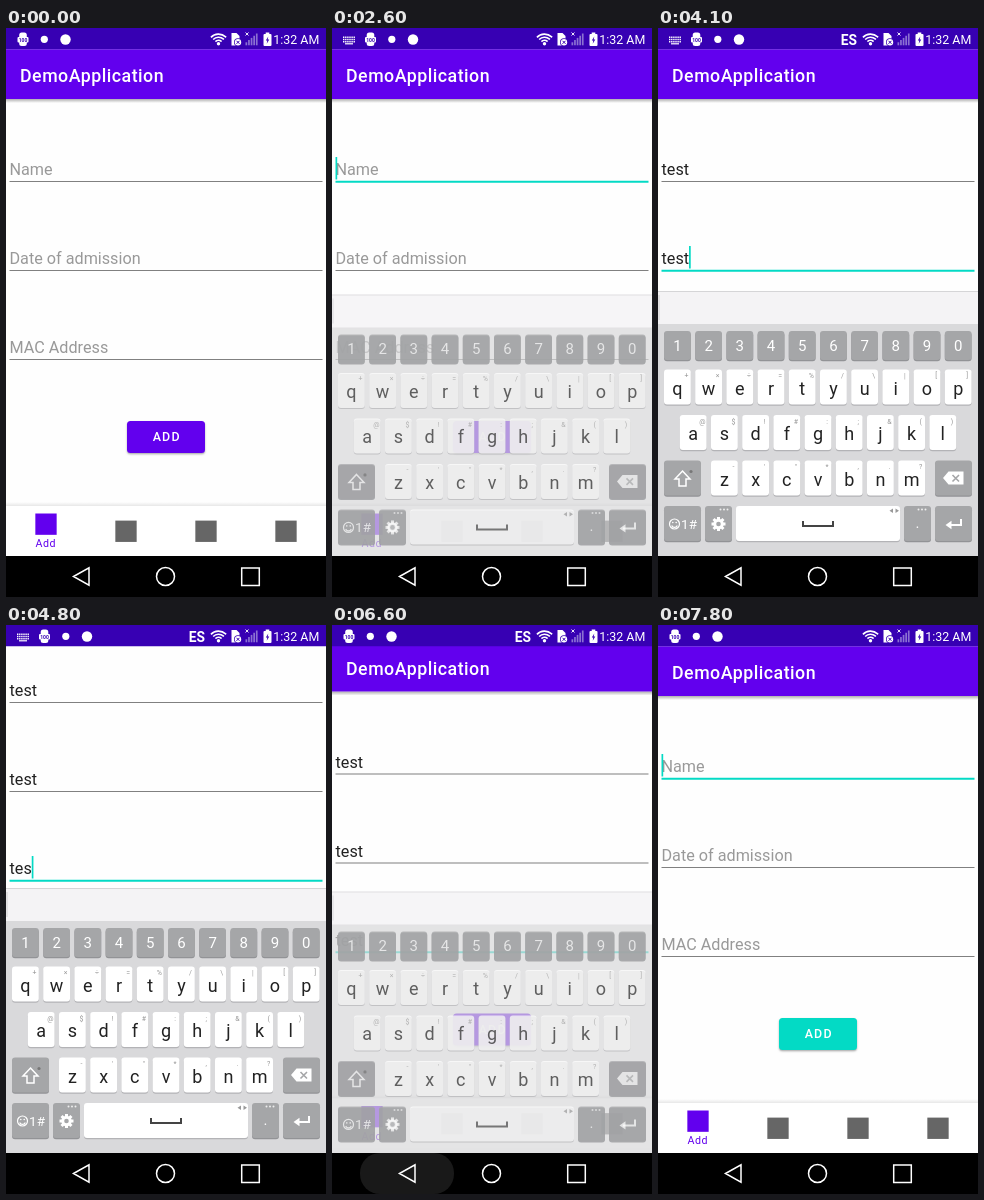
Animation, 320 px wide and 569 px high, one loop 8000 ms. Source, as an HTML page with a canvas:

```html
<!DOCTYPE html>
<html lang="en">
<head>
<meta charset="utf-8">
<title>Form demo</title>
<style>
html, body { margin: 0; width: 320px; height: 569px; overflow: hidden; background: #fff; }
canvas { display: block; width: 320px; height: 569px; }
</style>
</head>
<body>
<canvas id="stage" width="320" height="569"></canvas>
<script>
const ctx = document.getElementById('stage').getContext('2d');
const LOOP = 8000, STEP = 100, PAN = 76;
const STATUS_H = 21.33, TOOLBAR_END = 71.1;
const PURPLE = '#6200ee', DARK = '#3700b3', TEAL = '#03dac5', KEY_GREY = '#a5a6a8';

const clamp = v => Math.max(0, Math.min(1, v));
const ramp = (t, from, to) => clamp((t - from) / (to - from));
const easeOut = (p, power = 2) => 1 - (1 - p) ** power;

// Scroll curve: short exponential start, long exponential settling
function viscous(p) {
  const curve = x => x < 1 ? x - 1 + Math.exp(-x) : 1 - (1 - Math.exp(-1)) * Math.exp(1 - x);
  return curve(8 * p) / curve(8);
}

function rect(x, y, w, h, fill, r = 0) {
  ctx.fillStyle = fill;
  ctx.beginPath();
  ctx.roundRect(x, y, w, h, r);
  ctx.fill();
}

function disc(x, y, r, fill) {
  ctx.fillStyle = fill;
  ctx.beginPath();
  ctx.arc(x, y, r, 0, 7);
  ctx.fill();
}

function path(d, { fill, stroke, width = 1.5 }) {
  const p = new Path2D(d);
  if (fill) { ctx.fillStyle = fill; ctx.fill(p); }
  if (stroke) { ctx.strokeStyle = stroke; ctx.lineWidth = width; ctx.stroke(p); }
}

function text(s, x, y, size, color, { weight = 400, align = 'left', spacing = 0 } = {}) {
  ctx.font = `${weight} ${size}px Roboto, sans-serif`;
  ctx.letterSpacing = spacing + 'px';
  ctx.textAlign = align;
  ctx.fillStyle = color;
  ctx.fillText(s, x, y);
}

// Each field: hint, underline position, [time, value] edits
const fields = [
  { hint: 'Name', y: 153, edits: [[3100, 't'], [3200, 'tes'], [3300, 'test'], [7500, '']] },
  { hint: 'Date of admission', y: 242, edits: [[3800, 't'], [3900, 'te'], [4000, 'tes'], [4100, 'test'], [7500, '']] },
  { hint: 'MAC Address', y: 331, edits: [[4600, 't'], [4700, 'te'], [4800, 'tes'], [5000, 'test'], [7500, '']] }
];
const focusChanges = [[0, -1], [2400, 0], [3500, 1], [4250, 2], [7500, 0]];
const latest = (list, t) => list.filter(e => e[0] <= t).pop();

function drawFields(t) {
  const [focusTime, focus] = latest(focusChanges, t);
  fields.forEach((f, i) => {
    const [editTime, value] = latest(f.edits, t) || [0, ''];
    text(value || f.hint, 3.5, f.y - 6, 16.2, value ? '#212121' : '#999');
    const active = i === focus;
    if (active) rect(3.5, f.y - 0.3, 313, 2, TEAL);
    else rect(3.5, f.y, 313, 1, '#808080');
    const blinkOn = (t - Math.max(focusTime, editTime)) % 1000 < 500;
    if (active && blinkOn) {
      const x = value ? 3.5 + ctx.measureText(value).width : 3.5;
      rect(x, f.y - 24, 1.7, 22.5, TEAL);
    }
  });
}

function drawButton(t) {
  const lift = ramp(t, 7200, 7300) - ramp(t, 7500, 7700);
  ctx.save();
  ctx.shadowColor = 'rgba(0,0,0,.32)';
  ctx.shadowBlur = 2 + 3 * lift;
  ctx.shadowOffsetY = 1.2 + 1.8 * lift;
  rect(121, 393, 78, 32, t < 7400 ? PURPLE : TEAL, 3.5);
  ctx.restore();
  text('ADD', 160.7, 413.4, 12.44, '#fff', { weight: 500, align: 'center', spacing: 1.2 });
}

function drawApp(t) {
  const shadow = ctx.createLinearGradient(0, TOOLBAR_END, 0, 75);
  shadow.addColorStop(0, 'rgba(0,0,0,.3)');
  shadow.addColorStop(1, 'rgba(0,0,0,0)');
  rect(0, TOOLBAR_END, 320, 4, shadow);
  rect(0, STATUS_H, 320, TOOLBAR_END - STATUS_H, PURPLE);
  text('DemoApplication', 14, 54, 17.78, '#fff', { weight: 500, spacing: 0.5 });
  drawFields(t);
  drawButton(t);

  const edge = ctx.createLinearGradient(0, 474, 0, 478);
  edge.addColorStop(0, 'rgba(0,0,0,0)');
  edge.addColorStop(1, 'rgba(0,0,0,.09)');
  rect(0, 474, 320, 4, edge);
  rect(0, 478, 320, 50, '#fff');
  const icon = 21.33;
  rect(40 - icon / 2, 485.5, icon, icon, PURPLE);
  text('Add', 39.7, 519, 10.67, PURPLE, { align: 'center', spacing: 0.5 });
  for (const x of [120, 200, 280]) rect(x - icon / 2, 492.6, icon, icon, '#666');
}

function key(x, y, w, h, fill) {
  rect(x, y + 1.2, w, h, fill === '#fff' ? '#b3b3b6' : '#929396', 3);
  rect(x, y, w, h, fill, 3);
}

function keyRow(letters, marks, x0, y) {
  [...letters].forEach((c, i) => {
    const x = x0 + i * 31.2;
    key(x, y, 26.8, 35, '#fff');
    text(c, x + 13.4, y + 25, 18, '#222', { align: 'center' });
    text(marks[i], x + 22.5, y + 8.5, 7, '#999', { align: 'center' });
  });
}

function drawKeyIcons() {
  path('M24.5 443 L32 451 H28 V458 H21 V451 H17 Z', { stroke: '#fff' });
  disc(33, 443.5, 1.6, '#777');
  path('M285 450 L290.5 443.5 H305.5 V456.5 H290.5 Z', { fill: '#fff' });
  path('M294.5 447 L301 453.5 M301 447 L294.5 453.5', { stroke: KEY_GREY, width: 1.6 });

  path('M21.5 496 a5 5 0 1 1 -10 0 a5 5 0 1 1 10 0 M13.7 497.5 a3 3 0 0 0 5.6 0', { stroke: '#fff', width: 1.2 });
  disc(14.8, 494.5, 0.8, '#fff');
  disc(18.2, 494.5, 0.8, '#fff');
  text('1#', 31, 501, 13.5, '#fff', { align: 'center' });

  ctx.save();
  ctx.translate(60.5, 496);
  for (let i = 0; i < 8; i++) {
    rect(-1.5, -7, 3, 4, '#fff');
    ctx.rotate(Math.PI / 4);
  }
  disc(0, 0, 5.2, '#fff');
  disc(0, 0, 2.3, KEY_GREY);
  ctx.restore();
  for (const x of [62.5, 260.5]) {
    for (let i = 0; i < 3; i++) disc(x + i * 3.5, 481.5, 1, '#eee');
  }

  path('M145 493 V498 H175 V493', { stroke: '#444', width: 2 });
  path('M235 480.5 V485 L231.5 482.8 Z M237.5 480.5 V485 L241 482.8 Z', { fill: '#999' });
  text('.', 259.5, 500, 15, '#fff', { align: 'center' });
  path('M303 491 V497 H291', { stroke: '#fff', width: 2 });
  path('M287.5 497 L293.5 492.8 V501.2 Z', { fill: '#fff' });
}

function drawKeyboard(t) {
  const enter = ramp(t, 2500, 2800), exit = ramp(t, 6500, 6650);
  if (!enter || exit === 1) return;
  ctx.save();
  ctx.globalAlpha = easeOut(enter, 3) * (1 - exit ** 3);
  ctx.beginPath();
  ctx.rect(0, 0, 320, 528);
  ctx.clip();
  ctx.translate(0, 26 * (1 - easeOut(enter, 5) + exit ** 5));
  rect(0, 263, 320, 34, '#f4f3f5');
  rect(0, 263, 320, 1, '#d5d5d7');
  rect(0.5, 267, 1, 25, '#d0d0d2');
  rect(0, 296, 320, 232, '#d9d9db');
  [...'1234567890'].forEach((c, i) => {
    const x = 6 + i * 31.2;
    key(x, 303, 26.8, 29, KEY_GREY);
    text(c, x + 13.4, 323, 15, '#fff', { align: 'center' });
  });
  keyRow('qwertyuiop', '+×÷=%/\\|[]', 6, 341.5);
  keyRow('asdfghjkl', '@$!#:;&()', 21.8, 387);
  keyRow('zxcvbnm', '-\'"*,.?', 53, 432.5);
  for (const [x, y, w] of [[6, 432.5, 37], [277, 432.5, 37], [6, 478, 37], [47, 478, 27], [246, 478, 27], [277, 478, 37]]) {
    key(x, y, w, 35, KEY_GREY);
  }
  key(78, 478, 164, 35, '#fff');
  drawKeyIcons();
  ctx.restore();
}

function drawStatusBar(t) {
  rect(0, 0, 320, STATUS_H, DARK);
  const typing = t >= 2500 && t < 6500;
  ctx.save();
  if (typing) {
    for (let row = 0; row < 3; row++) {
      for (let col = 0; col < 6; col++) rect(11 + col * 2.1, 8.5 + row * 2.3, 1.4, 1.5, '#fff');
    }
    rect(13, 15.2, 8, 1.2, '#fff');
    ctx.translate(21.5, 0);
  }
  rect(13.2, 4.5, 7.6, 13.5, '#fff', 2.5);
  rect(11.5, 9, 11, 5.5, '#fff', 1);
  text('100', 17, 13.7, 5, DARK, { weight: 700, align: 'center' });
  disc(38.3, 11.3, 3.6, '#fff');
  disc(59.5, 11.5, 5.2, '#fff');
  ctx.restore();

  if (t >= 3100 && t < 7500) text('ES', 182.7, 16.5, 13.8, '#fff', { weight: 700 });

  for (const r of [4.2, 7.3, 10.4]) {
    ctx.strokeStyle = '#fff';
    ctx.lineWidth = 1.6;
    ctx.beginPath();
    ctx.arc(212.5, 16.5, r, -Math.PI * 0.76, -Math.PI * 0.24);
    ctx.stroke();
  }
  disc(212.5, 15.8, 1.7, '#fff');

  path('M225.5 5 H230.5 L233.5 8 V17.5 H225.5 Z', { fill: '#fff' });
  disc(232, 14.3, 4, DARK);
  disc(232, 14.3, 3.2, '#fff');
  path('M230.5 12.8 L233.5 15.8 M233.5 12.8 L230.5 15.8', { stroke: DARK, width: 1 });

  path('M239.5 4.5 L242.5 7.5 M242.5 4.5 L239.5 7.5', { stroke: '#fff', width: 0.9 });
  for (let i = 0; i < 5; i++) {
    const h = 3 + i * 2.2;
    rect(239.5 + i * 2.6, 17.3 - h, 1.7, h, '#8b70d2');
  }

  rect(257.5, 6, 8, 12, '#fff', 1);
  rect(259.7, 4.5, 3.6, 2, '#fff');
  path('M262.3 8.5 L259.8 12.5 H261.3 L260.7 15.8 L263.3 11.5 H261.7 Z', { fill: DARK });
  text('1:32 AM', 267.3, 16, 12.44, '#fff');
}

function drawNavBar(t) {
  rect(0, 528, 320, 41, '#000');
  const spread = easeOut(ramp(t, 6200, 6500));
  const fade = 1 - ramp(t, 6500, 6900);
  if (spread && fade) {
    ctx.globalAlpha = fade;
    const w = 94 * spread;
    rect(75 - w / 2, 528, w, 41, '#222', Math.min(20, w / 2));
    ctx.globalAlpha = 1;
  }
  path('M67.5 548.5 L83 539.8 V557.2 Z M168.5 548.5 a9 9 0 1 1 -18 0 a9 9 0 1 1 18 0 M235.7 540 H253.3 V557.5 H235.7 Z',
    { stroke: '#fff', width: 1.5 });
}

function draw(now) {
  const t = Math.floor((now % LOOP) / STEP) * STEP;
  const pan = PAN * (viscous(ramp(t, 4250, 4500)) - viscous(ramp(t, 6495, 6745)));
  rect(0, 0, 320, 569, '#fefefe');
  ctx.save();
  ctx.translate(0, -pan);
  drawApp(t);
  ctx.restore();
  drawKeyboard(t);
  drawStatusBar(t);
  drawNavBar(t);
  requestAnimationFrame(draw);
}
requestAnimationFrame(draw);
</script>
</body>
</html>
```
